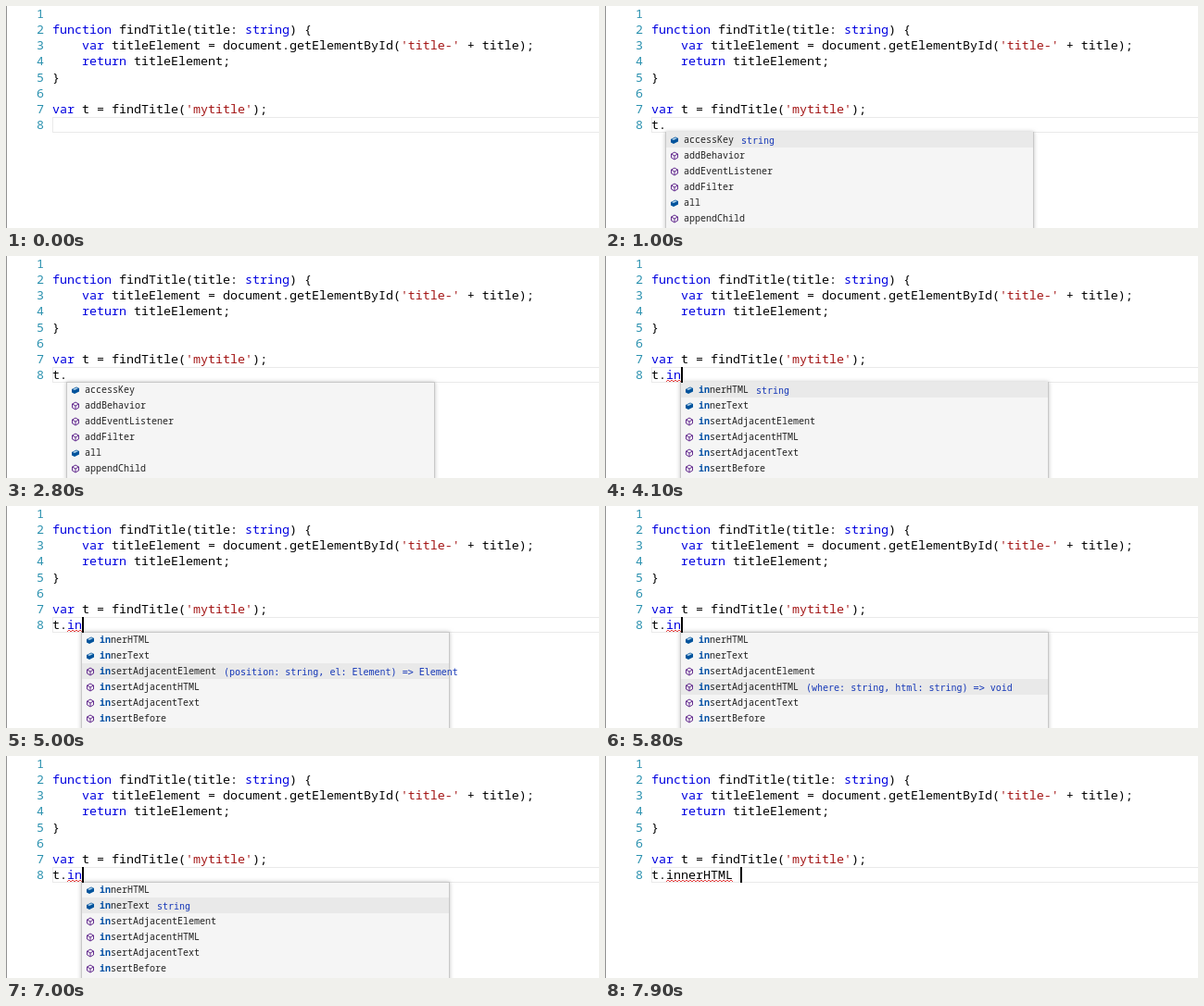
Recreate the animation shown at these times as an HTML page. Size 640x240 px, loop 8 s.

```html
<!DOCTYPE html>
<html lang="en">
<head>
<meta charset="utf-8">
<title>Code completion</title>
<style>
html, body { margin: 0; width: 100%; height: 100%; overflow: hidden; background: #fff; }
svg { display: block; }
text { font: 13.333px "Noto Sans Mono", "DejaVu Sans Mono", monospace; white-space: pre; }
.num { fill: #2b91af; }
.key { fill: #0000e0; }
.str { fill: #a31515; }
.item { font-size: 10px; fill: #222; }
.match { fill: #0451a5; font-weight: bold; }
.hint { font: 10px "DejaVu Sans Mono", monospace; fill: #1638b8; }
</style>
</head>
<body>
<svg width="640" height="240" viewBox="0 0 640 240">
  <defs>
    <filter id="shadow" x="-5%" y="-5%" width="110%" height="110%">
      <feDropShadow dx="0" dy="0" stdDeviation="2" flood-color="#999" flood-opacity=".6"/>
    </filter>
    <g id="field">
      <path d="M-4-1 1-3.5 4-2V1.5L-1 4-4 2.5Z" fill="#00539c"/>
      <path d="M-3-.9 1-2.8 3-1.9-1 0Z" fill="#b5d3ea"/>
    </g>
    <path id="method" d="M0-4 3.5-2V2L0 4-3.5 2V-2ZM-3.5-2 0 0 3.5-2M0 0V4" fill="none" stroke="#652d90"/>
  </defs>
  <path d="M.5 0V240" stroke="#909090"/>
  <rect x="50.5" y="120.5" width="600" height="16" fill="none" stroke="#eaeaea"/>
  <g id="code"></g>
  <g id="live"></g>
</svg>
<script>
const LOOP = 8000, CHAR = 8, LEFT = 50, ROW = 17;
const $ = id => document.getElementById(id);
const span = (cls, s) => `<tspan class="${cls}">${s}</tspan>`;
const baseline = line => Math.round(13 + (line - 1) * 17.14);
const paint = s => s
  .replace(/'[^']*'/g, m => span('str', m))
  .replace(/\b(function|var|return|string)\b/g, m => span('key', m));

const lines = [
  '',
  'function findTitle(title: string) {',
  "    var titleElement = document.getElementById('title-' + title);",
  '    return titleElement;',
  '}',
  '',
  "var t = findTitle('mytitle');",
  ''
];
$('code').innerHTML = lines.map((s, i) =>
  `<text class="num" x="33" y="${baseline(i + 1)}">${i + 1}</text>
   <text x="${LEFT}" y="${baseline(i + 1)}">${paint(s)}</text>`).join('');

// name, kind, hint
const members = [
  ['accessKey', 'field', 'string'],
  ['addBehavior', 'method', '(bstrUrl: string, factory?: any) => number'],
  ['addEventListener', 'method', '(type: string, listener: any) => void'],
  ['addFilter', 'method', '(filter: Object) => void'],
  ['all', 'field', 'HTMLCollection'],
  ['appendChild', 'method', '(newChild: Node) => Node']
];
const matches = [
  ['innerHTML', 'field', 'string'],
  ['innerText', 'field', 'string'],
  ['insertAdjacentElement', 'method', '(position: string, el: Element) => Element'],
  ['insertAdjacentHTML', 'method', '(where: string, html: string) => void'],
  ['insertAdjacentText', 'method', '(where: string, text: string) => void'],
  ['insertBefore', 'method', '(newChild: Node, ref?: Node) => Node']
];

// start time, typed text
const typing = [[-600, ''], [100, 't'], [300, 't.'], [3500, 't.i'], [3700, 't.in'],
  [7400, 't.innerHTML'], [7700, 't.innerHTML ']];
// start time, selected row; -1 is below the visible rows
const picks = [[0, 0], [1100, 1], [1400, 2], [1700, 3], [2000, 4], [2300, 5], [2600, -1],
  [3500, 0], [4600, 1], [4900, 2], [5300, 3], [6300, 2], [6600, 1], [7200, 0]];
const at = (list, t) => list.filter(e => e[0] <= t).pop();

function popup(x, items, prefix, pick) {
  const rows = items.map(([name, kind, hint], i) => {
    const y = 144 + i * ROW, n = prefix.length;
    const selected = i === pick;
    return (selected ? `<rect x="${x + 1}" y="${y - 8}" width="396" height="${ROW}" fill="#e9e9e9"/>` : '') +
      `<use href="#${kind}" x="${x + 10}" y="${y + 1}"/>
       <text class="item" x="${x + 20}" y="${y + 4}">${span('match', name.slice(0, n))}${name.slice(n)}</text>` +
      (selected ? `<text class="hint" x="${x + 28 + name.length * 6}" y="${y + 4.5}">${hint.replace('>', '&gt;')}</text>` : '');
  });
  return `<rect x="${x + .5}" y="136.5" width="397" height="120" fill="#f5f5f5" stroke="#c8c8c8" filter="url(#shadow)"/>` + rows.join('');
}

function squiggle(from, to) {
  let d = `M${from} 136`;
  for (let x = from + 2, up = true; x <= to; x += 2, up = !up) d += `L${x} ${up ? 134 : 136}`;
  return `<path d="${d}" fill="none" stroke="#e03030" stroke-width=".9"/>`;
}

function scene(t) {
  const [since, text] = at(typing, t);
  const end = LEFT + text.length * CHAR;
  const word = text.slice(2);
  let out = `<text x="${LEFT}" y="${baseline(8)}">${text.replace(/in$/, m => span('key', m))}</text>`;
  if (word) out += squiggle(66, 66 + word.trim().length * CHAR);
  if (t >= 500 && t < 7400)
    out += popup(end - 1, word ? matches : members, word, at(picks, t)[1]);
  if ((t - since) % 1000 < 500) out += `<rect x="${end}" y="120" width="2" height="17"/>`;
  return out;
}

let shown;
function frame() {
  const next = scene(performance.now() % LOOP);
  if (next !== shown) $('live').innerHTML = shown = next;
  requestAnimationFrame(frame);
}
frame();
</script>
</body>
</html>
```
